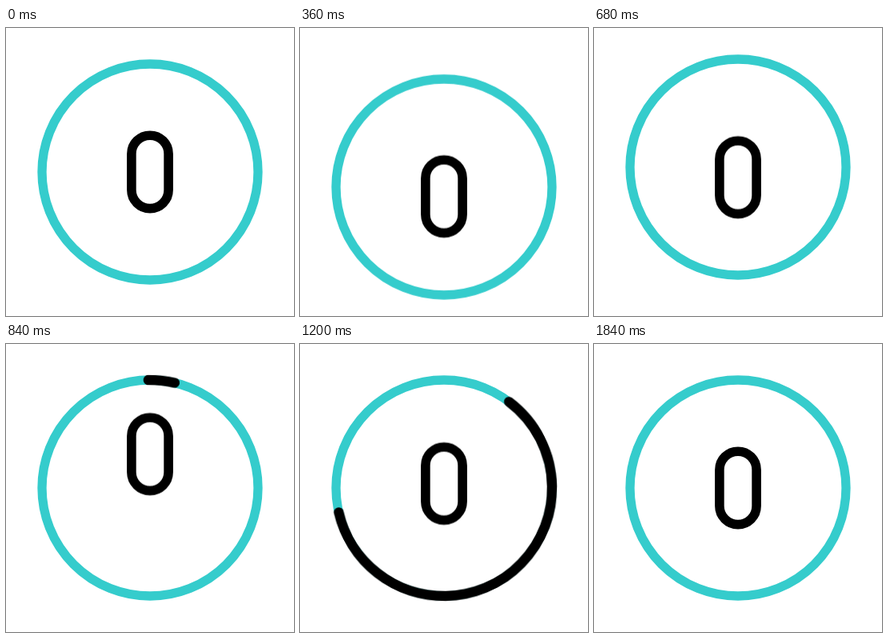
Recreate the animation shown at these times as an HTML page. Size 360 by 360 pixels, loop 2 s.

```html
<!DOCTYPE html>
<html lang="en">
<head>
<meta charset="utf-8">
<title>Zero in a ring</title>
<style>
  @property --from { syntax: "<length>"; inherits: false; initial-value: 0px; }
  @property --to { syntax: "<length>"; inherits: false; initial-value: 0px; }

  html, body { margin: 0; width: 100%; height: 100%; overflow: hidden; background: #fff; }
  svg { display: block; width: 100%; height: 100%; }
  circle, rect { fill: none; stroke: #000; }

  .bounce, .zero, .sweep {
    animation: 2s cubic-bezier(.3333, 0, .6667, 1) infinite;
  }
  .bounce { animation-name: bounce; }
  .zero { animation-name: jump; stroke-width: 11.6px; }
  .ring { stroke: #35cccc; stroke-width: 11.3px; }
  .sweep {
    animation-name: head, tail, show;
    stroke-width: 12.4px;
    stroke-linecap: round;
    stroke-dasharray: calc(var(--to) - var(--from)) 720px;
    stroke-dashoffset: calc(-1 * var(--from));
  }

  @keyframes bounce {
    0%, 6% { transform: translateY(0); }
    18% { transform: translateY(18.8px); }
    28% { transform: translateY(-17.5px); }
    38%, 100% { transform: translateY(0); }
  }
  /* Relative to the bouncing ring */
  @keyframes jump {
    0%, 6% { transform: translateY(0); }
    30% { transform: translateY(23.5px); }
    50% { transform: translateY(-77.5px); }
    62%, 100% { transform: translateY(0); }
  }
  @keyframes head {
    0%, 38% { --to: 0px; }
    72%, 100% { --to: 360px; }
  }
  @keyframes tail {
    0%, 52% { --from: 0px; }
    92%, 100% { --from: 360px; }
  }
  @keyframes show {
    0%, 38.1% { visibility: hidden; }
    38.11%, 91.9% { visibility: visible; }
    91.91%, 100% { visibility: hidden; }
  }
</style>
</head>
<body>
<svg viewBox="0 0 360 360">
  <g class="bounce">
    <circle class="ring" cx="180" cy="180" r="135"/>
    <rect class="zero" x="156.9" y="134.2" width="46.2" height="91.4" rx="23.1"/>
  </g>
  <circle class="sweep" cx="180" cy="180" r="135" pathLength="360" transform="rotate(-90.9 180 180)"/>
</svg>
</body>
</html>
```
